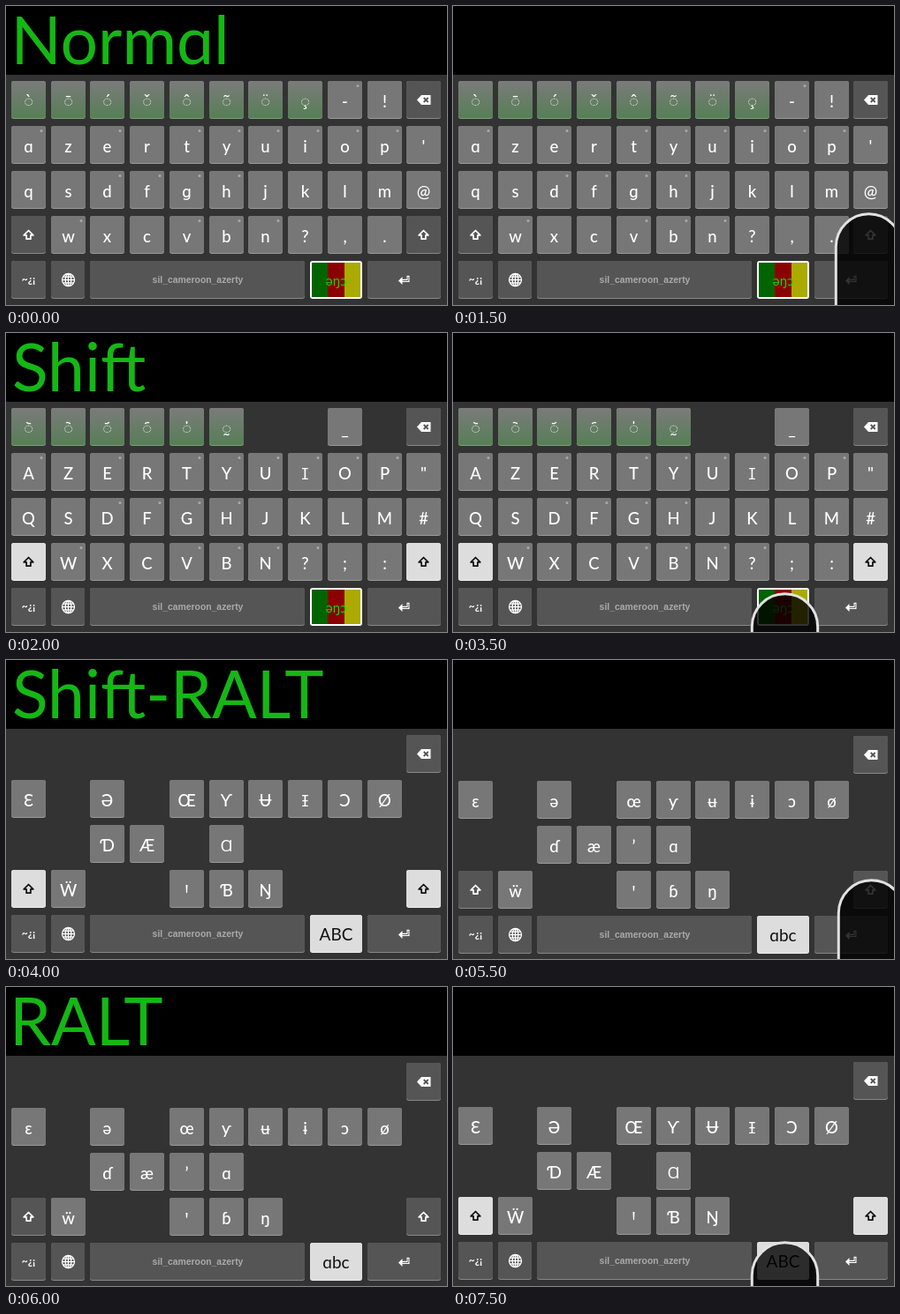
An HTML page with a canvas for the animation above (8 s loop, 499 by 339 pixels).

```html
<!DOCTYPE html>
<html lang="en">
<head>
<meta charset="utf-8">
<title>Keyboard layers</title>
<style>
html, body { margin: 0; width: 100%; height: 100%; overflow: hidden; background: #000; }
canvas { display: block; }
</style>
</head>
<body>
<canvas id="stage" width="499" height="339"></canvas>
<script>
const ctx = document.getElementById('stage').getContext('2d');
const FACE = 'Lato, "Noto Sans", "DejaVu Sans", sans-serif';
const KEY_FONT = '500 18.5px ' + FACE;
const MARK_FONT = '500 18px "Noto Sans", "DejaVu Sans", sans-serif';
const SERIF_I_FONT = '500 18px "Noto Sans Mono", monospace';
const PITCH = 44.73, KEY_W = 39, KEY_H = 43;
const GREY = '#777', DARK = '#555', LIGHT = '#ddd';

// Each row lists columns 0 to 10; '.' in `dots` marks a key with alternates.
const layers = {
  normal: {
    rows: ['\u0300 \u0304 \u0301 \u030c \u0302 \u0303 \u0308 \u0327 - !',
      "ɑ z e r t y u i o p '", 'q s d f ɡ h j k l m @', '| w x c v b n ? , .'],
    dots: ['--------.', '.-.-.......', '--..' + '..', '-.--...'],
    dotCols: [[8], [0, 2, 4, 5, 6, 7, 8, 9], [2, 3, 4, 5], [1, 4, 5, 6]]
  },
  shift: {
    rows: ['\u1dc5 \u1dc6 \u1dc4 \u1dc7 \u030d \u0330 | | _',
      'A Z E R T Y U I O P "', 'Q S D F G H J K L M #', '| W X C V B N ? ; :'],
    dotCols: [[], [0, 2, 4, 5, 6, 7, 8, 9], [2, 3, 4, 5], [1, 4, 5, 6, 7]],
    shifted: true
  },
  ralt: {
    rows: ['', 'ɛ | ə | œ ƴ ʉ ɨ ɔ ø', '| | ɗ æ ’ ɑ', '| ẅ | | ꞌ ɓ ŋ'],
    mode: 'ɑbc'
  },
  shiftRalt: {
    rows: ['', 'Ɛ | Ə | Œ Ƴ Ʉ Ɨ Ɔ Ø', '| | Ɗ Æ | Ɑ', '| Ẅ | | Ꞌ Ɓ Ŋ'],
    mode: 'ABC', shifted: true
  }
};
delete layers.normal.dots;

const scenes = [
  { end: 1500, layer: 'normal', title: 'Normɑl', x: 5.5 },
  { end: 2000, layer: 'normal', touch: [470.5, 273] },
  { end: 3500, layer: 'shift', title: 'Shift', x: 7 },
  { end: 4000, layer: 'shift', touch: [375.5, 333] },
  { end: 5500, layer: 'shiftRalt', title: 'Shift-RALT', x: 7 },
  { end: 6000, layer: 'ralt', touch: [473.5, 287], dy: 1 },
  { end: 7500, layer: 'ralt', title: 'RALT', x: 4, dy: 1 },
  { end: 8000, layer: 'shiftRalt', touch: [375.5, 327] }
];

const colX = c => Math.round(6 + c * PITCH);
const rowY = r => 85 + r * 51;

function label(text, x, y, font, color = '#fff', align = 'center') {
  ctx.font = font;
  ctx.fillStyle = color;
  ctx.textAlign = align;
  ctx.fillText(text, x, y);
}

function box(x, y, w, h, fill, radius = 3) {
  ctx.beginPath();
  ctx.roundRect(x, y, w, h, radius);
  ctx.fillStyle = fill;
  ctx.fill();
}

function key(x, y, w, fill, edge = '#999') {
  box(x, y, w, KEY_H, edge);
  box(x, y, w, KEY_H - 1, fill);
}

function line(points, close) {
  ctx.beginPath();
  points.forEach(([x, y]) => ctx.lineTo(x, y));
  if (close) ctx.closePath();
}

function at(x, y, draw) {
  ctx.save();
  ctx.translate(x, y);
  draw();
  ctx.restore();
}

function shiftIcon(x, y, color) {
  at(x, y, () => {
    line([[0, -5], [5.3, .4], [2.4, .4], [2.4, 4.7], [-2.4, 4.7], [-2.4, .4], [-5.3, .4]], true);
    ctx.strokeStyle = color;
    ctx.lineWidth = 1.7;
    ctx.lineJoin = 'round';
    ctx.stroke();
  });
}

function backspaceIcon(x, y) {
  at(x, y, () => {
    line([[-8, 0], [-3, -5.5], [7.5, -5.5], [7.5, 5.5], [-3, 5.5]], true);
    ctx.fillStyle = '#fff';
    ctx.fill();
    ctx.strokeStyle = DARK;
    ctx.lineWidth = 1.8;
    for (const s of [-1, 1]) {
      line([[-.3, -2.5 * s], [4.7, 2.5 * s]]);
      ctx.stroke();
    }
  });
}

function enterIcon(x, y) {
  at(x, y, () => {
    line([[-6.5, 1], [-2, -3.6], [-2, -.7], [3, -.7], [3, -4.8], [6, -4.8], [6, 2.6], [-2, 2.6], [-2, 5.4]], true);
    ctx.fillStyle = '#fff';
    ctx.fill();
    line([[-2, 1], [4.5, 1], [4.5, -3.5]]);
    ctx.strokeStyle = DARK;
    ctx.lineWidth = .9;
    ctx.stroke();
  });
}

function globeIcon(x, y) {
  at(x, y, () => {
    ctx.strokeStyle = '#fff';
    ctx.lineWidth = 1.3;
    for (const rx of [7, 3.3]) {
      ctx.beginPath();
      ctx.ellipse(0, 0, rx, 7, 0, 0, 7);
      ctx.stroke();
    }
    for (const [a, b, v] of [[-7, 7, 0], [-6, 6, -3.4], [-6, 6, 3.4]]) {
      line([[a, v], [b, v]]);
      ctx.stroke();
    }
    line([[0, -7], [0, 7]]);
    ctx.stroke();
  });
}

function charKey(ch, c, r, dotted) {
  const x = colX(c), y = rowY(r), mid = x + KEY_W / 2;
  const mark = r === 0 && c < 8;
  let fill = GREY;
  if (mark) {
    fill = ctx.createLinearGradient(0, y, 0, y + KEY_H);
    fill.addColorStop(0, '#7b7b7b');
    fill.addColorStop(1, '#557f55');
  }
  key(x, y, KEY_W, fill, mark ? '#7d9d7d' : '#999');
  if (mark) label('\u25cc' + ch, mid, y + 29, MARK_FONT);
  else label(ch, mid, y + 29.5, /[IƗ]/.test(ch) ? SERIF_I_FONT : KEY_FONT);
  if (dotted) box(x + 32.5, y + 4, 3, 3, '#aaa', 1.5);
}

function shiftKey(c, on) {
  key(colX(c), rowY(3), KEY_W, on ? LIGHT : DARK, on ? '#eee' : '#888');
  shiftIcon(colX(c) + 19.5, rowY(3) + 21.5, on ? '#111' : '#fff');
}

function modeKey(text) {
  const y = rowY(4);
  if (text) {
    key(344, y, 59, LIGHT, '#eee');
    label(text, 373.5, y + 29, '400 19px ' + FACE, '#111');
    return;
  }
  box(344, y, 59, KEY_H, '#fff');
  ['#006400', '#8b0000', '#aaaa00'].forEach((color, i) => {
    ctx.fillStyle = color;
    ctx.fillRect([346, 364, 383][i], y + 2, [18, 19, 18][i], KEY_H - 4);
  });
  label('əŋɔ', 373.5, y + 28, '400 15px ' + FACE, '#00e000');
}

function keyboard(layer) {
  layer.rows.forEach((row, r) => {
    row.split(' ').forEach((ch, c) => {
      if (ch && ch !== '|') charKey(ch, c, r, layer.dotCols && layer.dotCols[r].includes(c));
    });
  });
  key(453, rowY(0), KEY_W, DARK, '#888');
  backspaceIcon(473, rowY(0) + 21.5);
  shiftKey(0, layer.shifted);
  shiftKey(10, layer.shifted);

  const y = rowY(4);
  for (const [x, w] of [[6, 39], [51, 38], [95, 243], [409, 83]]) key(x, y, w, DARK, '#888');
  label('~¿¡', 25.5, y + 25, '700 12px ' + FACE);
  globeIcon(70.5, y + 21.5);
  label('sil_cameroon_azerty', 217, y + 25, '700 10.4px "Liberation Sans", Arial, sans-serif', '#aaa');
  modeKey(layer.mode);
  enterIcon(450.5, y + 21.5);
}

function fingertip([x, y]) {
  ctx.beginPath();
  ctx.arc(x, y, 37.2, Math.PI, 0);
  ctx.lineTo(x + 37.2, 400);
  ctx.lineTo(x - 37.2, 400);
  ctx.closePath();
  ctx.fillStyle = 'rgba(0,0,0,.8)';
  ctx.fill();
  ctx.strokeStyle = '#e2e2e2';
  ctx.lineWidth = 3;
  ctx.stroke();
}

function draw(now) {
  const t = now % 8000;
  const scene = scenes.find(s => t < s.end);
  ctx.fillStyle = '#000';
  ctx.fillRect(0, 0, 499, 78);
  ctx.fillStyle = '#333';
  ctx.fillRect(0, 78, 499, 261);
  if (scene.title) label(scene.title, scene.x, 66, '400 75px ' + FACE, '#15b715', 'left');
  at(0, scene.dy || 0, () => keyboard(layers[scene.layer]));
  if (scene.touch) fingertip(scene.touch);
}

const start = performance.now();
function tick() {
  draw(performance.now() - start);
  requestAnimationFrame(tick);
}
tick();
</script>
</body>
</html>
```
